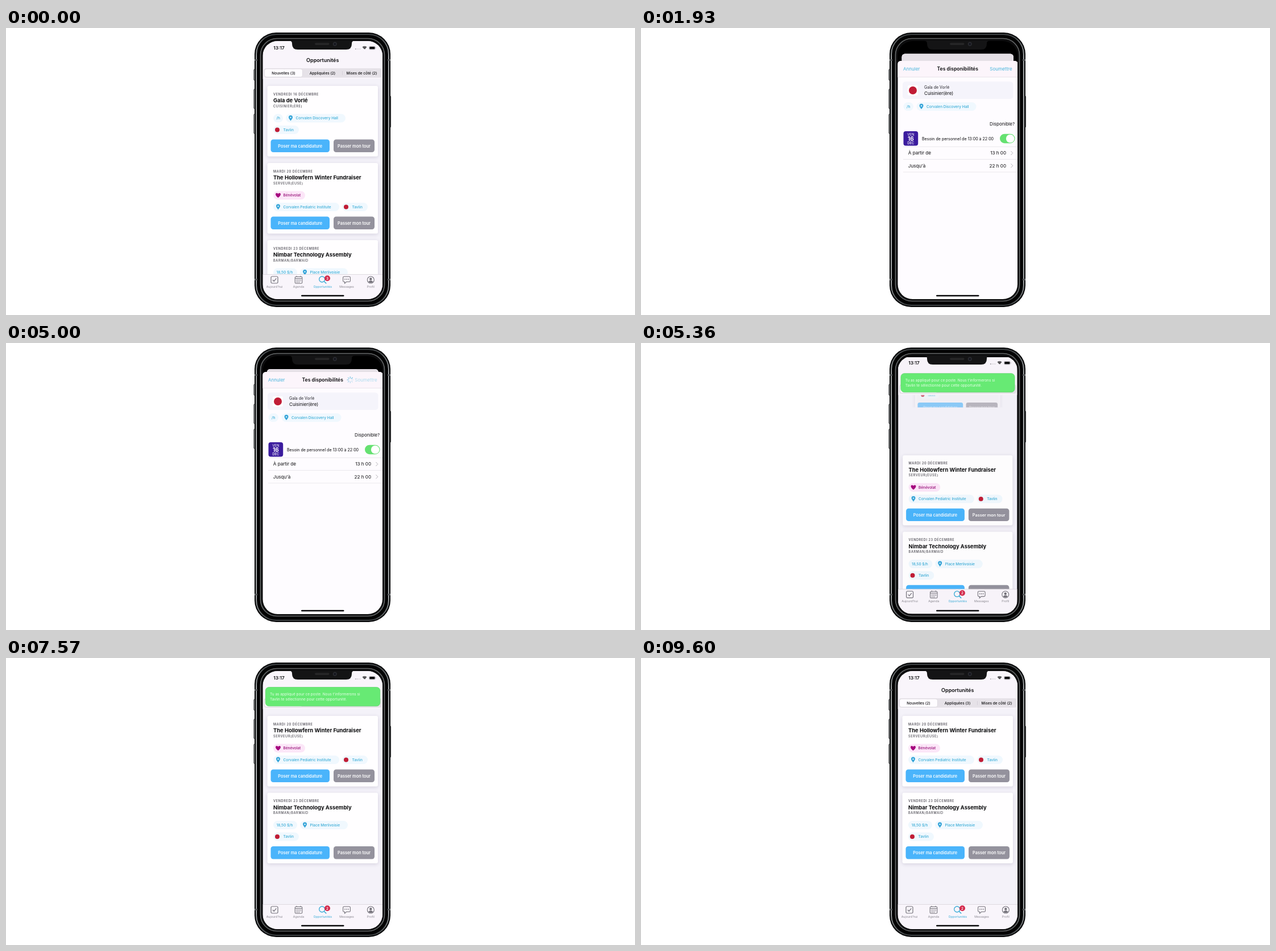
Write an HTML page with a canvas that moves like this. It is 1106 by 506 pixels and loops after 9710 ms.

```html
<!DOCTYPE html>
<html lang="fr">
<head>
<meta charset="utf-8">
<style>
  html, body { margin: 0; width: 100%; height: 100%; overflow: hidden; background: #fff; }
  canvas { display: block; }
</style>
</head>
<body>
<canvas id="stage" width="1106" height="506"></canvas>
<script>
const c = document.getElementById('stage').getContext('2d');
const LOOP = 9710, STEP = 1000 / 14, MID = 556.75, BOTTOM = 478;
const SHEET_IN = 24 * STEP, SHEET_OUT = 5060;
const BLUE = '#37abd6', INK = '#0b0b0d', GREY = '#74727a', RED = '#c01c35';
const HALL = 'Corvalen Discovery Hall', CLIENT = 'Tavlin', GALA = 'Gala de Vorlé';

const clamp = v => Math.min(1, Math.max(0, v));
const smooth = v => (v = clamp(v), v * v * (3 - 2 * v));
const easeOut = v => Math.sin(clamp(v) * Math.PI / 2);

// ---------- drawing helpers ----------
function box(x, y, w, h, r, fill, stroke, line = 1) {
  c.beginPath();
  c.roundRect(x, y, w, h, r);
  if (fill) { c.fillStyle = fill; c.fill(); }
  if (stroke) { c.strokeStyle = stroke; c.lineWidth = line; c.stroke(); }
}
function disc(x, y, r, fill, stroke, line = 1) {
  box(x - r, y - r, 2 * r, 2 * r, r, fill, stroke, line);
}
function path(d, stroke, line = 1, fill) {
  const p = new Path2D(d);
  if (fill) { c.fillStyle = fill; c.fill(p); }
  if (stroke) { c.strokeStyle = stroke; c.lineWidth = line; c.stroke(p); }
}
// y is the optical middle of the capitals
function text(s, x, y, size, { weight = 400, color = INK, align = 'left', gap = 0 } = {}) {
  c.font = `${weight} ${size}px Inter, sans-serif`;
  c.letterSpacing = gap + 'px';
  c.textAlign = align;
  c.fillStyle = color;
  c.fillText(s, x, y + size * 0.36);
}
function group(draw) { c.save(); draw(); c.restore(); }
function at(x, y, draw) { group(() => { c.translate(x, y); draw(); }); }

// ---------- list screen ----------
const pin = (x, y) => at(x, y, () => {
  path('M0 4.8C-1.5 2.2-3.5.6-3.5-1.4A3.5 3.5 0 0 1 3.5-1.4C3.5.6 1.5 2.2 0 4.8Z', null, 0, '#35a4d8');
  disc(0, -1.3, 1.2, '#dff2fb');
});
const heart = (x, y) => at(x, y, () =>
  path('M0 4.2C-6.5-.6-4.6-4-2.4-4-1-4-.3-3.2 0-2.3.3-3.2 1-4 2.4-4 4.6-4 6.5-.6 0 4.2Z', null, 0, '#a6087f'));
const logo = (x, y) => disc(x, y, 4, RED);

function chip(x, y, w, label, icon) {
  const love = icon === heart;
  box(x, y - 7.5, w, 15, 7.5, love ? '#fce6f8' : '#f0f8fe');
  if (icon) icon(x + (icon === logo ? 7 : 8.5), y);
  text(label, x + (icon ? 17.5 : 5.5), y, 6.5, { weight: 500, color: love ? '#960d76' : BLUE });
}

const cards = [
  { date: 'VENDREDI 16 DÉCEMBRE', title: GALA, role: 'CUISINIER(ÈRE)',
    chips: [[470, 0, 17, '/h'], [492, 0, 105, HALL, pin], [470, 1, 45, CLIENT, logo]] },
  { date: 'MARDI 20 DÉCEMBRE', title: 'The Hollowfern Winter Fundraiser', role: 'SERVEUR(EUSE)',
    chips: [[470, 0, 56, 'Bénévolat', heart], [470, 1, 116, 'Corvalen Pediatric Institute', pin],
            [591, 1, 45, CLIENT, logo]] },
  { date: 'VENDREDI 23 DÉCEMBRE', title: 'Nimbar Technology Assembly', role: 'BARMAN/BARMAID',
    chips: [[470, 0, 42, '18,50 $/h'], [517, 0, 84, 'Place Merlivoisie', pin], [470, 1, 45, CLIENT, logo]] }
];

function drawCard({ date, title, role, chips }, y) {
  group(() => {
    c.shadowColor = 'rgba(50,40,80,.16)';
    c.shadowBlur = 6;
    c.shadowOffsetY = 1.5;
    box(459.5, y, 194.5, 124.5, 3, '#fffeff');
  });
  text(date, 470, y + 14.5, 5.6, { weight: 600, color: '#5c5a62', gap: 0.6 });
  text(title, 470, y + 26, 9.4, { weight: 700 });
  text(role, 470, y + 35.5, 5.6, { weight: 500, color: '#4c4a52', gap: 0.65 });
  for (const [x, row, w, label, icon] of chips) chip(x, y + 57 + row * 20.5, w, label, icon);
  box(465.5, y + 94.5, 103.5, 22.5, 4.5, '#4ab4fb');
  box(576, y + 94.5, 72, 22.5, 4.5, '#94929d');
  text('Poser ma candidature', 517.2, y + 106, 7.4, { weight: 600, color: '#f4fbff', align: 'center' });
  text('Passer mon tour', 612, y + 106, 7.35, { weight: 600, color: '#fff', align: 'center' });
}

function drawList(gone) {
  group(() => {
    c.beginPath();
    c.rect(451, 88, 212, 347);
    c.clip();
    if (gone < 0.75) group(() => {
      c.beginPath();
      c.rect(451, 88, 212, 142 - 390 * gone);
      if (gone) c.clip();
      c.globalAlpha = clamp(1 - 1.3 * gone);
      c.translate(MID, 164.5 - 284 * gone);
      c.scale(1 - 0.74 * gone, 1 - 0.74 * gone);
      c.translate(-MID, -164.5);
      drawCard(cards[0], 102);
    });
    drawCard(cards[1], 238 - 136 * gone);
    drawCard(cards[2], 374 - 136.5 * gone);
  });
}

function drawHeader(applied) {
  box(451, 20, 212, 70, 0, '#f9f5fb');
  text('Opportunités', MID, 57, 9, { weight: 600, align: 'center' });
  box(453.5, 71, 207, 16.5, 4, '#e6e2e8');
  box(454.5, 72, 67, 14.5, 3.5, '#fefcff', '#d6d2d9', 0.7);
  path('M591.5 76V83', '#cbc7ce', 0.6);
  const tab = (s, x) => text(s, x, 79.3, 6.5, { weight: 500, align: 'center' });
  tab(`Nouvelles (${applied ? 2 : 3})`, 488);
  tab(`Appliquées (${applied ? 3 : 2})`, 556.5);
  tab('Mises de côté (2)', 625.5);
}

function drawTabs(applied) {
  box(451, 434.5, 212, 45, 0, '#f9f5fb');
  path('M451 434.5H663', '#d8d4da', 0.8);
  const item = (x, label, color, icon) => {
    text(label, x, 456, 5.3, { color, align: 'center' });
    at(x, 444, icon);
  };
  item(472, "Aujourd'hui", '#8a8890', () => {
    box(-6, -6, 12, 12, 2, null, GREY, 1.2);
    path('M-3 0L-.8 2.5L3.3-2.6', GREY, 1.2);
  });
  item(514.5, 'Agenda', '#8a8890', () => {
    box(-6.3, -5.5, 12.6, 11.8, 1.8, null, GREY, 1.1);
    path('M-6-2.5H6M-3.5-7V-5M3.5-7V-5', GREY, 1.1);
    for (let i = 0; i < 11; i++) box(-4.2 + (i % 4) * 2.4, -0.8 + Math.floor(i / 4) * 2.2, 1.3, 1.2, 0, GREY);
  });
  item(556.7, 'Opportunités', BLUE, () => {
    disc(-1, -1, 5, null, BLUE, 1.3);
    path('M2.7 2.7L6.5 6.5', BLUE, 1.5);
    disc(8.3, -2.7, 5, '#d42a4c');
    text(applied ? '2' : '3', 8.3, -2.7, 6.2, { weight: 600, color: '#fff', align: 'center' });
  });
  item(599, 'Messages', '#8a8890', () => {
    path('M-4.5-5.8H4.5Q6.4-5.8 6.4-4V1.7Q6.4 3.5 4.5 3.5H-.5L-3.5 6.3V3.5H-4.5Q-6.4 3.5-6.4 1.7V-4Q-6.4-5.8-4.5-5.8Z', GREY, 1.1);
    for (const x of [-3, 0, 3]) disc(x, -1.2, 0.9, GREY);
  });
  item(641.3, 'Profil', '#8a8890', () => {
    disc(0, 0, 6, null, GREY, 1.1);
    disc(0, -1.5, 2.2, GREY);
    path('M-4 3.6Q-3 1.3 0 1.3T4 3.6Q0 6.8-4 3.6Z', null, 0, GREY);
  });
}

function drawStatus(t) {
  text('13:17', 470.3, 35.2, 8.2, { weight: 600 });
  // signal search: a pulse runs over the four dots
  const pulse = ((t - 6500 + LOOP * 2) % 1070) / 270;
  for (let i = 0; i < 4; i++) {
    const glow = clamp(1 - Math.abs(pulse - i - 0.3));
    disc(614.7 + i * 2.6, 37, 0.75, `rgba(30,28,34,${0.25 + 0.45 * glow})`);
  }
  for (const r of [1.8, 3.5, 5.2]) {
    c.beginPath();
    c.arc(630.5, 38, r, -2.3, -0.84);
    c.strokeStyle = INK;
    c.lineWidth = 1.25;
    c.stroke();
  }
  box(638.3, 32.2, 11, 5.8, 1.6, null, '#aaa7ad', 0.6);
  box(639.2, 33, 9.3, 4.2, 1, INK);
  box(649.9, 34.2, 0.8, 1.8, 0.4, '#aaa7ad');
}

// ---------- availability sheet ----------
function spinner(x, y, step) {
  at(x, y, () => {
    c.lineCap = 'round';
    for (let i = 0; i < 8; i++) {
      const fade = ((i - step) % 8 + 8) % 8 / 7;
      c.rotate(Math.PI / 4);
      path('M0-3V-5.4', `rgba(75,180,220,${0.2 + 0.6 * fade})`, 1.3);
    }
  });
}

function drawSheet(top, t) {
  at(0, top, () => {
    box(451, 0, 212, 440, [6, 6, 0, 0], '#fefcff');
    box(451, 0, 212, 28.5, [6, 6, 0, 0], '#fcf5fb');
    path('M451 28.5H663', '#e6e0e6', 0.8);
    text('Annuler', 461, 14, 8, { color: '#45b4dc' });
    text('Tes disponibilités', MID, 14, 8.6, { weight: 600, align: 'center' });
    const busy = t >= 4570;
    text('Soumettre', 652.6, 14, 8.05, { color: busy ? '#addcee' : '#45b4dc', align: 'right' });
    if (busy) spinner(605.3, 14, Math.floor(Math.max(0, t - 4860) / 100));

    box(460, 36.5, 194.5, 30.5, 5, '#f5f4fb');
    box(469, 43, 18, 18, 3, '#fff');
    disc(478, 52, 7, RED);
    text(GALA, 498, 46.3, 7, { color: '#25242a' });
    text('Cuisinier(ère)', 498, 57.5, 8.05);
    chip(461.5, 80.5, 17.5, '/h');
    chip(484.5, 80.5, 105, HALL, pin);

    text('Disponible?', 657, 111, 8, { align: 'right' });
    box(461.5, 124, 25.7, 25.5, 4, '#3b1c9e');
    const day = (s, y, size, weight) => text(s, 474.3, y, size, { weight, color: '#fff', align: 'center' });
    day('VEN', 129.7, 6, 400);
    day('16', 137.3, 10, 700);
    day('DÉC', 145.3, 6, 500);
    text('Besoin de personnel de 13:00 à 22:00', 494, 137, 7.05);
    box(631, 128.7, 26.5, 16.5, 8.25, '#65e171');
    disc(649.2, 137, 7.3, '#fff');
    const row = (label, hour, y) => {
      text(label, 469.8, y, 8.1);
      text(hour, 642, y, 8.1, { align: 'right' });
      at(652, y, () => path('M-1.6-3.5L1.8 0L-1.6 3.5', '#b5b2b9', 1));
    };
    row('À partir de', '13 h 00', 162.5);
    row("Jusqu'à", '22 h 00', 184.8);
    path('M461 151.3H663M461 173.6H663M461 196H663', '#e6e3e8', 0.8);
  });
}

function drawBanner(y) {
  box(456.3, y, 201.4, 33.2, 6, '#67ea74', '#5fd56c', 0.8);
  const line = (s, dy) => text(s, 464, y + dy, 6.5, { color: '#e8ffea' });
  line("Tu as appliqué pour ce poste. Nous t'informerons si", 12);
  line(`${CLIENT} te sélectionne pour cette opportunité.`, 21);
}

// ---------- phone ----------
function drawPhone() {
  for (const [y, h] of [[73, 19], [108, 34], [152, 34]]) box(435.7, y, 3, h, 1, '#c4c7c8', '#1c1d1f', 0.8);
  box(674, 120, 2.6, 55, 1, '#c4c7c8', '#1c1d1f', 0.8);
  box(437, 8, 239, 484, 38, '#08090a');
  const shine = c.createLinearGradient(0, 8, 0, 492);
  [[0, '#3b3f41'], [0.09, '#b4b8b9'], [0.5, '#d0d3d4'], [0.91, '#b4b8b9'], [1, '#3b3f41']]
    .forEach(([stop, color]) => shine.addColorStop(stop, color));
  box(440.2, 11.2, 232.6, 477.6, 35, null, shine, 1.7);
  box(442.5, 13.5, 228, 473, 33, '#030303');
  box(447.5, 18.5, 218, 463, 29, '#0c0c0d', '#646768', 1.7);
  for (const y of [55, 442]) {
    box(437, y, 5, 3, 0, '#55585a');
    box(671, y, 5, 3, 0, '#55585a');
  }
}

function drawNotch() {
  path('M498 22H613Q608 23 608 27V28Q608 38 598 38H513Q503 38 503 28V27Q503 23 498 22Z', null, 0, '#141415');
  box(543, 26.3, 25.5, 3.6, 1.8, '#262627');
  disc(578.3, 28.2, 3.2, '#222329', '#303136', 0.8);
  disc(578.3, 28.2, 1.2, '#0b0c14');
}

// the list screen sinks back while the sheet is open
function behind(depth, draw) {
  group(() => {
    const scale = 1 - 0.068 * depth;
    c.translate(MID, 23 + 23 * depth);
    c.scale(scale, scale);
    c.translate(-MID, -23);
    c.beginPath();
    c.roundRect(451.5, 23, 210.5, 455, 6 * depth);
    c.clip();
    draw();
  });
}

function render(t) {
  const opened = t < SHEET_IN ? 0 : 1 - 0.321 * Math.exp((SHEET_IN - t) / 72);
  const close = duration => opened * (1 - easeOut((t - SHEET_OUT) / duration));
  const open = close(270), depth = close(417);
  const applied = t >= 5150;
  const gone = smooth((t - 5200) / 430);

  c.clearRect(0, 0, 1106, 506);
  drawPhone();
  group(() => {
    c.beginPath();
    c.roundRect(451.5, 23, 210.5, 455, 26);
    c.clip();
    box(451, 22, 212, 457, 0, '#000');
    behind(depth, () => {
      box(451, 22, 212, 457, 0, '#f4f2f9');
      drawList(gone);
      drawHeader(applied);
      drawTabs(applied);
      if (depth) box(451, 22, 212, 457, 0, `rgba(20,0,20,${0.09 * depth})`);
    });
    if (open < 0.3) drawStatus(t);
    if (applied && t < 8860) behind(depth, () => {
      const away = 1 - easeOut((t - 5150) / 200) + clamp((t - 8500) / 360) ** 2;
      drawBanner(51.6 - 90 * away);
    });
    if (open > 0.005) drawSheet(BOTTOM - 427 * open, t);
    box(519, 470.8, 75.5, 2.5, 1.25, '#08080a');
  });
  drawNotch();
}

const start = performance.now();
function tick() {
  const t = (performance.now() - start) % LOOP;
  render(Math.floor((t + 5) / STEP) * STEP);
  requestAnimationFrame(tick);
}
tick();
</script>
</body>
</html>
```
